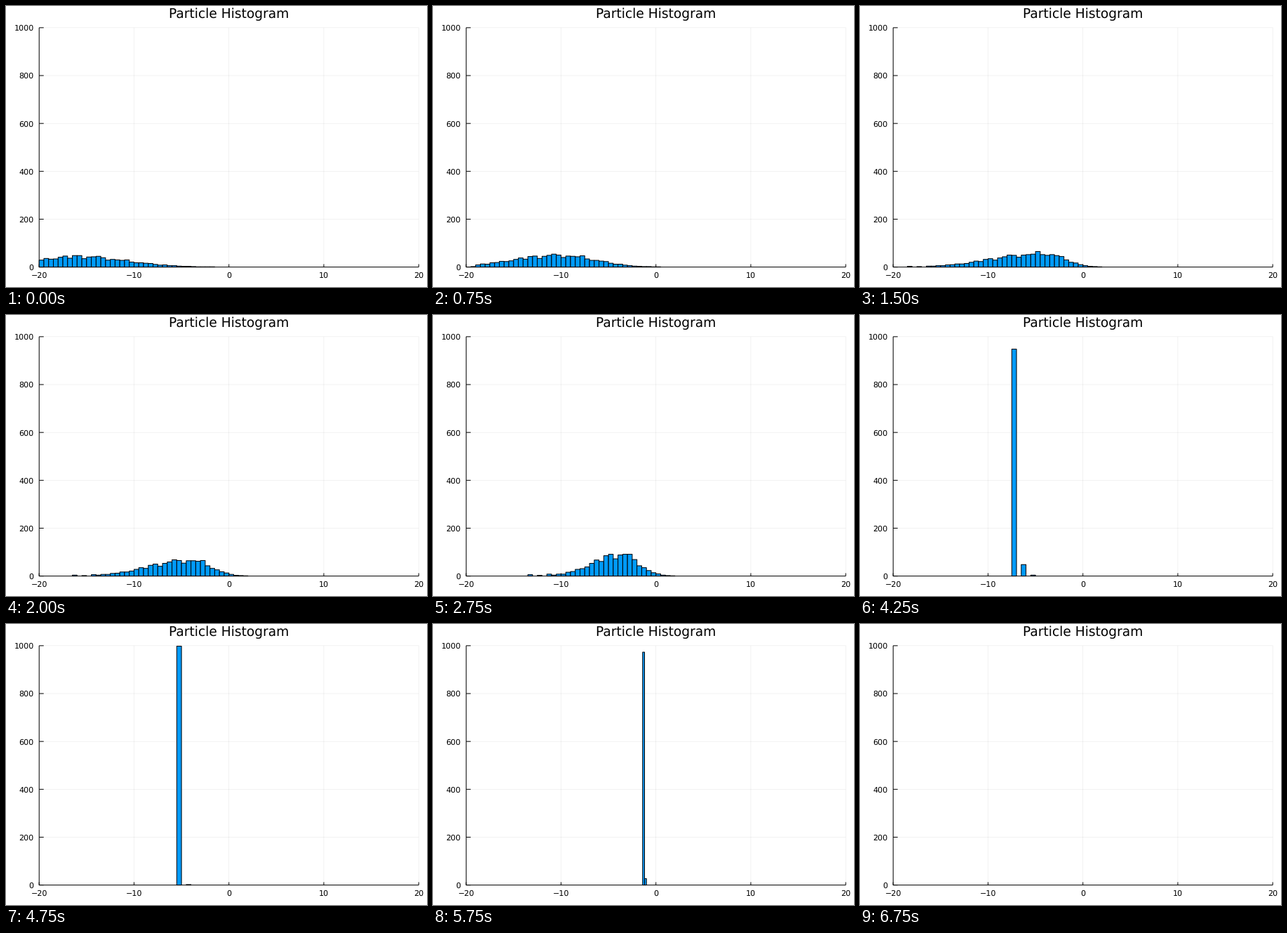
A matplotlib script for the animation above (8 s loop, 600 px wide and 400 px high).

```python
import numpy as np
import matplotlib.pyplot as plt
from matplotlib.animation import FuncAnimation
from matplotlib.collections import LineCollection, PolyCollection

plt.rcParams["text.hinting"] = "none"

W, H, DPI = 600, 400, 100
PX = 72 / DPI                      # points per pixel
STEP_MS, STEPS = 250, 32
LEFT, RIGHT, TOP, BOTTOM = 47.24, 588.19, 30.87, 371.61
XMIN, XMAX, TOTAL = -20, 20, 1000
XTICKS, YTICKS = range(XMIN, XMAX + 1, 10), range(0, TOTAL + 1, 200)
TICK = 0.012                       # tick length as a share of the axis

BIN, FINE = 0.5, 0.2
START = np.arange(-24.5, 4, BIN)   # bin edges in the frame of the drift
GRAIN = np.random.default_rng(4).uniform(0.8, 1.2, START.size)
STRAGGLERS = {-24.5: 6, -23.5: 3, -22.5: 8}

# Cloud shape: mode and the spread on either side of it
SHAPE_STEPS = [0, 6, 11]
MODE = [-15.5, -4, -3.5]
SPREAD_L = [5, 5.2, 3]
SPREAD_R = [4.8, 2, 1.7]
SELECT, NARROW, EMPTY = 11, 21, 27


def cloud(step):
    """Two-sided bell that drifts right, with a few stragglers behind it."""
    mode, left, right = (np.interp(step, SHAPE_STEPS, v)
                         for v in (MODE, SPREAD_L, SPREAD_R))
    d = START + step + BIN / 2 - mode
    peak = TOTAL * BIN / (np.sqrt(np.pi / 2) * (left + right))
    n = peak * GRAIN * np.exp(-0.5 * (d / np.where(d < 0, left, right)) ** 2)
    n[START < -22] = 0
    for x, count in STRAGGLERS.items():
        n[START == x] = count * step / SELECT
    return n


def counts(step):
    """Resampling favours the rearmost particles more and more strongly."""
    n = cloud(min(step, SELECT))
    if step > SELECT:
        d = START - START[0]
        strength = ((step - SELECT) / 4) ** 3
        n *= np.exp(-strength * (0.5 * d + 0.18 * d ** 2))
        n *= TOTAL / n.sum()
    return np.round(n)


def bars(step):
    """Return (left, width, count) for each visible bar."""
    if step >= EMPTY:
        return []
    if step >= NARROW:
        x = step - 24.4
        ahead = round(27 * 0.5 ** (step - 23))
        return [(x, FINE, TOTAL - ahead), (x + FINE, FINE, ahead)]
    return [(x, BIN, n) for x, n in zip(START + step, counts(step))
            if n > 0 and x >= XMIN]


fig = plt.figure(figsize=(W / DPI, H / DPI), dpi=DPI, facecolor="white")
ax = fig.add_axes([LEFT / W, 1 - BOTTOM / H,
                   (RIGHT - LEFT) / W, (BOTTOM - TOP) / H])
ax.set(xlim=(XMIN, XMAX), ylim=(0, TOTAL), xticks=XTICKS, yticks=YTICKS)
ax.spines[:].set_visible(False)
for axis, pad in (("x", 6.4), ("y", 7.6)):
    ax.tick_params(axis=axis, length=0, pad=pad * PX, labelsize=11.1 * PX)
fig.text((LEFT + RIGHT) / 2 / W, 1 - 17.5 / H, "Particle Histogram",
         fontsize=18.6 * PX, ha="center", va="baseline")


def add_lines(segments, **style):
    ax.add_collection(LineCollection(segments, color="black", snap=False,
                                     clip_on=False, **style), autolim=False)


def rules(x_len, y_len):
    """Lines from the axes at every tick, reaching the given lengths."""
    return ([[(x, 0), (x, x_len)] for x in XTICKS]
            + [[(XMIN, y), (XMIN + y_len, y)] for y in YTICKS])


add_lines(rules(TOTAL, XMAX - XMIN), lw=0.5 * PX, alpha=0.1, zorder=1)
add_lines([[(XMIN, TOTAL), (XMIN, 0), (XMAX, 0)]]
          + rules(TICK * TOTAL, TICK * (XMAX - XMIN)), lw=PX, zorder=1.5)

hist = PolyCollection([], facecolor="#009AFA", edgecolor="black",
                      linewidth=PX, snap=False, clip_on=False, zorder=2)
ax.add_collection(hist, autolim=False)


def draw(step):
    hist.set_verts([[(x, 0), (x, n), (x + w, n), (x + w, 0)]
                    for x, w, n in bars(step)])
    return [hist]


anim = FuncAnimation(fig, draw, frames=STEPS, interval=STEP_MS, repeat=True)
plt.show()
```
